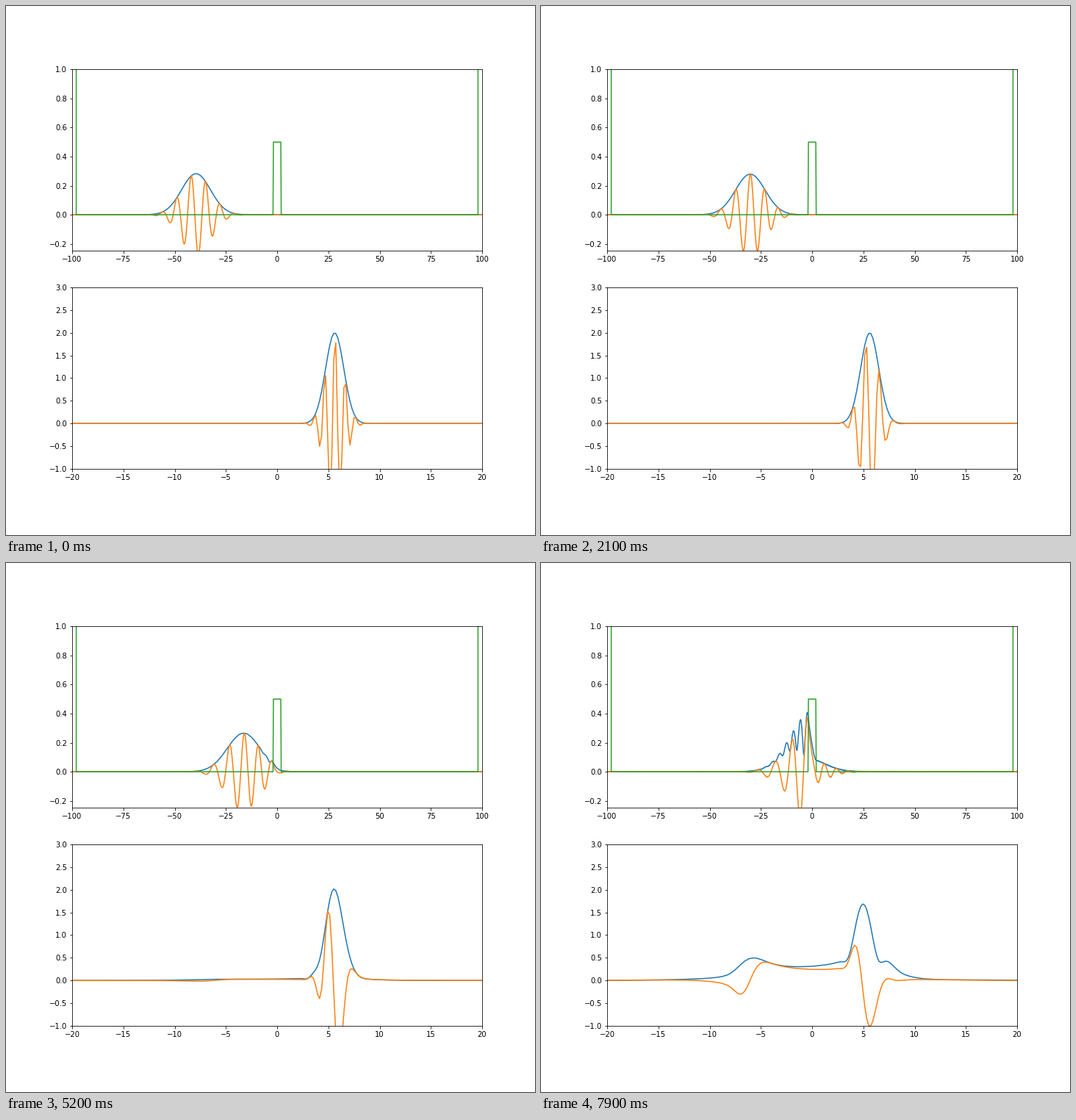
These frames come from a looping animation (720x720 px, 8 s). A matplotlib script:

```python
import numpy as np
import matplotlib.pyplot as plt
from matplotlib.animation import FuncAnimation

FRAMES = 80
DT, SUBSTEPS = 0.1, 5

# grid
N, LENGTH = 1000, 200.0
dx = LENGTH / N
x = np.round(dx * (np.arange(N) - N // 2), 6)
k = 2 * np.pi * np.fft.fftfreq(N, dx)

# square barrier between hard walls (hbar = m = 1)
V0 = 0.5
V = np.where(np.abs(x) < 2, V0, 0.0)
V[np.abs(x) > 98] = 1e6

# Gaussian packet with 80% of the barrier energy
p0 = np.sqrt(2 * 0.8 * V0)
width = 1 / np.sqrt(2 * p0**2 / 80)
x0 = -40.0
start = (width * np.sqrt(np.pi)) ** -0.5 * np.exp(
    -0.5 * ((x - x0) / width) ** 2 + 1j * p0 * x)

half_kick = np.exp(-0.5j * V * DT)
drift = np.exp(-0.5j * k**2 * DT)


def evolve(psi):
    """Split-step propagation over one frame."""
    for _ in range(SUBSTEPS):
        psi = half_kick * np.fft.ifft(drift * np.fft.fft(half_kick * psi))
    return psi


def momentum(psi):
    phi = np.fft.fft(psi) * np.exp(-1j * k * x[0]) * dx / np.sqrt(2 * np.pi)
    return np.fft.fftshift(phi)


states = []
psi = start
for _ in range(FRAMES):
    psi = evolve(psi)
    states.append((psi, momentum(psi)))

fig, (ax_x, ax_k) = plt.subplots(2, 1, figsize=(10, 10), dpi=72)
fig.subplots_adjust(left=0.125, right=0.9, bottom=0.125, top=0.88, hspace=0.2)
ax_x.set(xlim=(-100, 100), ylim=(-0.25, 1))
ax_k.set(xlim=(-20, 20), ylim=(-1, 3))

k_axis = 2 * np.pi * np.fft.fftshift(k)
pairs = [[ax.plot(grid, 0 * grid)[0] for _ in range(2)]
         for ax, grid in ((ax_x, x), (ax_k, k_axis))]
ax_x.plot(x, V)


def update(i):
    for (modulus, real), wave in zip(pairs, states[i]):
        modulus.set_ydata(np.abs(wave))
        real.set_ydata(wave.real)
    return [line for pair in pairs for line in pair]


anim = FuncAnimation(fig, update, frames=FRAMES, interval=100,
                     init_func=lambda: update(0), repeat=True, repeat_delay=0)
plt.show()
```
